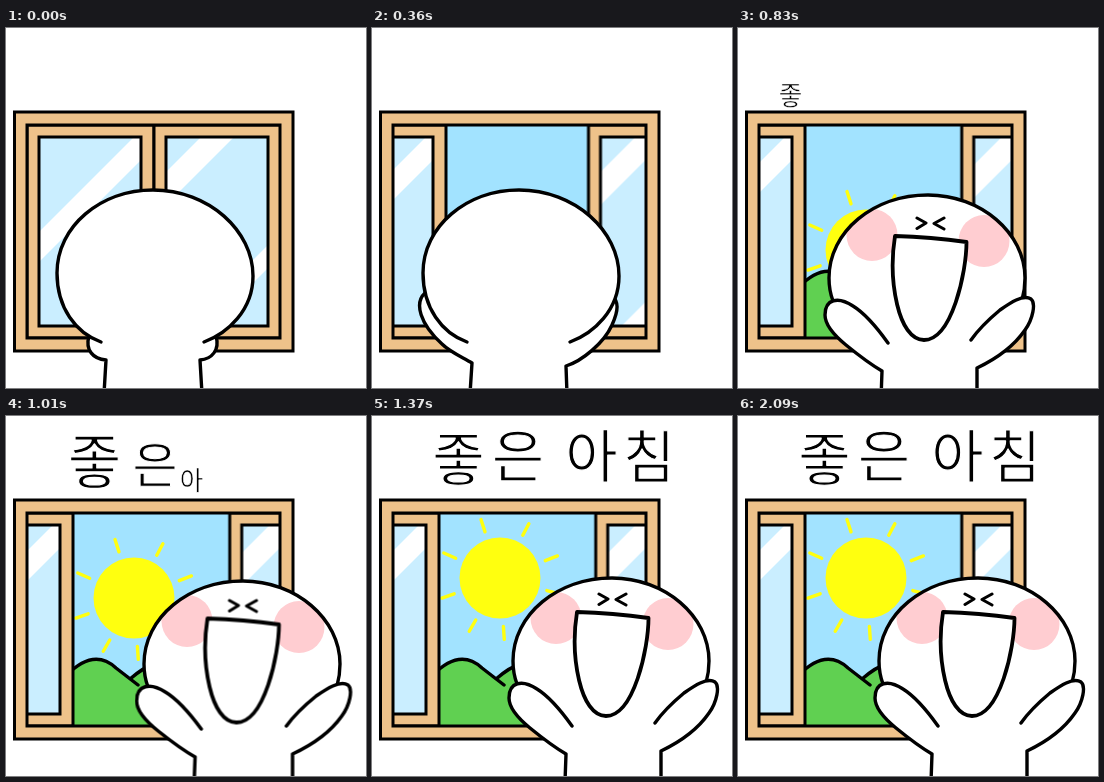
An HTML page without scripts that plays this animation: 360x360 px, repeating every 2180 ms.

```html
<!DOCTYPE html>
<html lang="ko">
<head>
<meta charset="utf-8">
<title>좋은 아침</title>
<style>
html, body { margin: 0; width: 100%; height: 100%; overflow: hidden; background: #fff; }
svg { display: block; width: 100vw; height: 100vh; }
.line { stroke: #000; stroke-width: 3.4; stroke-linecap: round; stroke-linejoin: round; }
.white { fill: #fff; }
.wood { fill: #eec28a; stroke: #000; stroke-width: 3; }
.glass { fill: #caeeff; }
.edge { fill: none; stroke: #000; stroke-width: 3; }
.hill { fill: #60d051; }
.rays { stroke: #ffff0f; stroke-width: 3.4; stroke-linecap: round; }
/* the white stroke thins the letters */
text {
  font: 400 57px "Noto Sans CJK KR", "Noto Sans CJK", sans-serif;
  text-anchor: middle; stroke: #fff; stroke-width: 1.2px; stroke-linejoin: round;
}

.move { animation: 2180ms step-end infinite; }
.left { animation-name: left; }
.right { animation-name: right; }
.glint { animation-name: glint; }
.back { animation-name: back; }
.back-head { animation-name: back-head; }
.back-body { animation-name: back-body; }
.front, .words { animation-name: front; }
.head { animation-name: head; }
.body { animation-name: body; }
.face { animation-name: face; }
.sun { animation-name: sun; }
.rays { animation-name: rays; }
.pop { animation-name: pop; animation-delay: calc(var(--i) * 90ms); }

@keyframes left {
  0% { transform: none; }
  6.88% { transform: translateX(-8px); }
  10.09% { transform: translateX(-27px); }
  13.3% { transform: translateX(-52px); }
  16.51% { transform: translateX(-74px); }
  19.72%, 100% { transform: translateX(-81px); }
}
@keyframes right {
  0% { transform: none; }
  6.88% { transform: translateX(7px); }
  10.09% { transform: translateX(24px); }
  13.3% { transform: translateX(47px); }
  16.51% { transform: translateX(68.5px); }
  19.72%, 100% { transform: translateX(75.7px); }
}
@keyframes glint {
  0% { transform: none; }
  38.07%, 100% { transform: translateX(-7px); }
}
@keyframes back {
  0% { visibility: visible; }
  38.07%, 100% { visibility: hidden; }
}
@keyframes front {
  0% { visibility: hidden; }
  38.07%, 100% { visibility: visible; }
}
@keyframes back-head {
  0% { transform: none; }
  28.44% { transform: translateY(3px) scaleY(.995); }
  32.56%, 100% { transform: translateY(7.1px) scaleY(.987); }
}
@keyframes back-body {
  0% { d: path("M83 308C79 322 87 331 100 332L98 366H196L194 332C206 331 214 322 210 308"); }
  6.88% { d: path("M72 296C66 306 76 324 100 333L98 366H196L194 334C216 326 228 308 222 296"); }
  10.09% { d: path("M62 282C57 294 70 316 100 334L98 366H195L194 336C222 320 238 296 232 284"); }
  13.3% { d: path("M57 272C48 284 60 312 100 335L98 366H195L194 337C230 316 244 286 238 275"); }
  16.51% { d: path("M53 265C42 275 48 296 70 316C78 324 90 329 100 335L98 366H195L194 338C210 333 232 315 240 297C246 284 247 274 241 269"); }
  22.93% { d: path("M64 285C56 298 70 324 100 336L98 366H195L194 338C224 326 236 302 231 288"); }
  28.44%, 100% { d: path("M78 308C72 322 76 338 100 340L98 366H195L194 341C217 339 222 324 216 308"); }
}
@keyframes head {
  0%, 38.07% { transform: translate(-50px, 5px); }
  42.2% { transform: translate(-18px, 6px); }
  46.33% { transform: translate(-3px, 3px); }
  50.45% { transform: translate(1px, -1px); }
  54.58% { transform: translate(1px, -1px); }
  58.71%, 100% { transform: none; }
}
@keyframes body {
  0%, 38.07% { transform: translate(-50px, 5px); }
  42.2% { transform: translate(-24px, 5px) scaleX(1.02); }
  46.33% { transform: translate(-10px, 3px) scaleX(1.026); }
  50.45% { transform: translate(1px, -2px); }
  54.58% { transform: translateY(-1px); }
  58.71%, 100% { transform: none; }
}
@keyframes face {
  0%, 38.07% { transform: translate(-48px, 12px); }
  42.2% { transform: translate(-18px, 11px); }
  46.33% { transform: translate(-3.5px, 6.5px); }
  50.45% { transform: translate(1px, -2px); }
  54.58% { transform: translate(1px, -1px); }
  58.71%, 100% { transform: none; }
}
@keyframes sun {
  0% { transform: translate(128px, 250px); }
  38.07% { transform: translate(128px, 222px); }
  42.2% { transform: translate(128px, 202px); }
  46.33% { transform: translate(128px, 182px); }
  50.45% { transform: translate(128px, 168px); }
  54.58%, 100% { transform: translate(128px, 162px); }
}
@keyframes rays {
  0%, 46.33%, 54.58%, 62.84%, 71.1%, 79.35%, 87.61%, 95.87%, 100% { transform: none; }
  42.2%, 50.45%, 58.71%, 66.97%, 75.22%, 83.48%, 91.74% { transform: rotate(21deg); }
}
@keyframes pop {
  0% { transform: scale(0); }
  38.07% { transform: translate(-34px, 25px) scale(.45); }
  42.2% { transform: translate(3px, 9px) scale(.86); }
  46.33% { transform: translate(2px, 3px) scale(1.02); }
  50.45%, 100% { transform: none; }
}
</style>
</head>
<body>
<svg viewBox="0 0 360 360">
  <defs>
    <clipPath id="opening"><path d="M21 97H274V310H21Z"/></clipPath>
    <clipPath id="paneL"><path d="M33 109H135V298H33Z"/></clipPath>
    <clipPath id="paneR"><path d="M160 109H262V298H160Z"/></clipPath>
    <path id="skull" d="M145 268C142 260 141 253 141 245C141 198 186 162 240 162C293 162 337 200 337 245C337 253 336 260 334 267"/>
    <clipPath id="inside"><use href="#skull"/></clipPath>
    <path id="ray" d="M0 -48.500V-61.500"/>
  </defs>

  <!-- window -->
  <path class="wood" d="M8.500 84H287V323H8.500Z"/>
  <g clip-path="url(#opening)">
    <path fill="#a2e3ff" d="M21 97H274V310H21Z"/>
    <g class="move sun">
      <circle r="40.500" fill="#ffff0f"/>
      <g class="move rays">
        <use href="#ray" transform="rotate(-18)"/>
        <use href="#ray" transform="rotate(28)"/>
        <use href="#ray" transform="rotate(69)"/>
        <use href="#ray" transform="rotate(105)"/>
        <use href="#ray" transform="rotate(144)"/>
        <use href="#ray" transform="rotate(176)"/>
        <use href="#ray" transform="rotate(210)"/>
        <use href="#ray" transform="rotate(251)"/>
        <use href="#ray" transform="rotate(294)"/>
      </g>
    </g>
    <path class="hill line" stroke-width="3" d="M124 263C140 249 158 240 180 250C205 262 220 285 232 314H100"/>
    <path class="hill" d="M60 260C82 237 98 241 110 252L132 270L150 314H60Z"/>
    <path class="line" fill="none" d="M60 260C82 237 98 241 110 252L132 269"/>
    <g class="move left">
      <path class="wood" d="M21 97H148V310H21Z"/>
      <path class="glass" d="M33 109H135V298H33Z"/>
      <path class="white" clip-path="url(#paneL)" d="M137 100L17 220V250L167 100Z"/>
      <path class="edge" d="M33 109H135V298H33Z"/>
    </g>
    <g class="move right">
      <path class="wood" d="M148 97H275V310H148Z"/>
      <path class="glass" d="M160 109H262V298H160Z"/>
      <g clip-path="url(#paneR)">
        <g class="white move glint">
          <path d="M204 100L150 154V187L237 100Z"/>
          <path d="M279 200L170 309H193L279 223Z"/>
        </g>
      </g>
      <path class="edge" d="M160 109H262V298H160Z"/>
    </g>
  </g>
  <path class="edge" d="M21 97H274V310H21Z"/>

  <!-- seen from behind -->
  <g class="move back">
    <path class="white line move back-body" d="M83 308C79 322 87 331 100 332L98 366H196L194 332C206 331 214 322 210 308"/>
    <path class="white line move back-head" d="M95 314C70 305 51 280 51 245C51 198 95 162 147 162C203 162 247 203 247 248C247 282 222 305 198 314"/>
  </g>

  <!-- facing the viewer -->
  <g class="move front">
    <g class="move head">
      <ellipse class="white" cx="239" cy="242" rx="95" ry="78"/>
      <use href="#skull" class="white"/>
      <g fill="#ffcdd1" clip-path="url(#inside)">
        <ellipse cx="184" cy="202" rx="25.500" ry="26"/>
        <ellipse cx="296" cy="208" rx="25.500" ry="26"/>
      </g>
      <use href="#skull" class="line" fill="none"/>
    </g>
    <path class="white line move body" d="M200 310C190 296 178 281 165 273C150 263 137 266 137 282C137 293 147 303 158 312C169 321 182 331 194 338L193 366H289V335C310 325 326 313 337 297C345 286 348 270 343 266C335 261 322 270 312 277C300 287 290 297 283 307"/>
    <g class="move face">
      <path class="line" fill="none" style="stroke-width:3" d="M227 178L236 183L227 188.500M254 178L244 183.500L254 189"/>
      <path class="white line" style="stroke-width:3.800" d="M205 196Q241 197 276.500 202C276.500 232 262 300 234 300C208 300 198 240 205 196Z"/>
    </g>
  </g>

  <g class="move words">
    <g transform="translate(86.500 42)"><text class="move pop" style="--i:0" y="22">좋</text></g>
    <g transform="translate(146 39)"><text class="move pop" style="--i:1" y="22">은</text></g>
    <g transform="translate(219.500 39)"><text class="move pop" style="--i:2" y="22">아</text></g>
    <g transform="translate(277 40)"><text class="move pop" style="--i:3" y="22">침</text></g>
  </g>
</svg>
</body>
</html>
```
